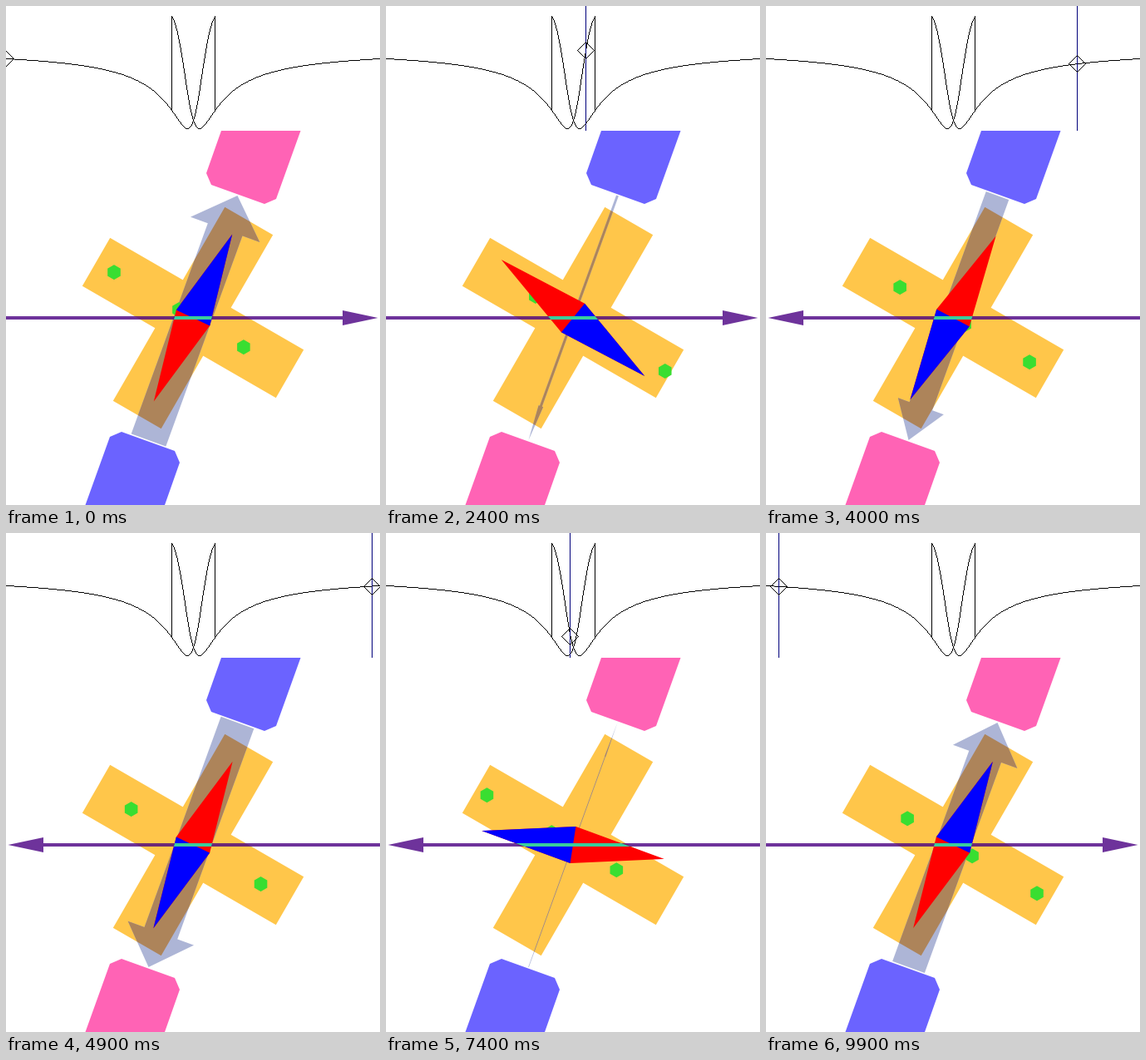
These frames come from a looping animation (450x600 px, 10000 ms). A matplotlib script:

```python
import numpy as np
import matplotlib.pyplot as plt
from matplotlib.animation import FuncAnimation
from matplotlib.collections import PolyCollection
from matplotlib.patches import Polygon

W, H, DPI = 450, 600, 100
FRAMES, STEP = 100, 100
MID = np.array([225.0, 375.0])

BLUE_PAD, PINK_PAD = "#6b63ff", "#ff63b5"
ORANGE, TEAL, GREEN = "#ffc64a", "#39ce9c", "#39de31"
INDIGO = (0.29, 0, 0.51, 0.8)
SHADE, SHADE_ON_CROSS = "#adb5d6", "#ad845a"
NAVY = "#00007b"

FIELD_ANGLE = np.radians(70)
BIAS = 22.5          # constant internal field, in plot pixels
SWITCH = 26          # applied field at which the bias flips
SWEEP_T = [0, 17, 31, 44, 48, 55, 65, 83, 99]
SWEEP_H = [-226, -34, 64, 187, 225, 157.5, 62, -69, -210]


def direction(angle):
    return np.array([np.cos(angle), -np.sin(angle)])


def local(points, angle):
    """Place (along, across) points on the axis through the centre."""
    d = direction(angle)
    n = np.array([-d[1], d[0]])
    p = np.asarray(points, float)
    return MID + p[:, :1] * d + p[:, 1:] * n


def moment_angle(h, bias):
    return np.arctan2(-h * np.sin(FIELD_ANGLE),
                      bias * BIAS - h * np.cos(FIELD_ANGLE))


def signal(h, bias):
    return 75 + 72 * np.sin(2 * moment_angle(h, bias) + np.pi / 3)


def bias_sign(i):
    """+1 or -1 after following the sweep up to step i."""
    sign = 1
    for h in np.interp(np.arange(i + 1), SWEEP_T, SWEEP_H):
        if h >= SWITCH:
            sign = -1
        elif h <= -SWITCH:
            sign = 1
    return sign


def trace(x, y):
    """Unit squares along a polyline, one pixel wide without smoothing."""
    pts = np.column_stack([np.round(x), np.round(y)])
    cells = []
    for p, q in zip(pts[:-1], pts[1:]):
        n = int(abs(q - p).max()) + 1
        cells.append(np.floor(np.linspace(p, q, n) + 0.5))
    corner = np.array([(0, 0), (1, 0), (1, 1), (0, 1)])
    return np.unique(np.vstack(cells), axis=0)[:, None] + corner


fig = plt.figure(figsize=(W / DPI, H / DPI), dpi=DPI, facecolor="white")
ax = fig.add_axes([0, 0, 1, 1])
ax.set_xlim(0, W)
ax.set_ylim(H, 0)
ax.axis("off")


def shape(points, color, z):
    patch = Polygon(points, closed=True, fc=color, ec="none", lw=0,
                    snap=False, zorder=z)
    return ax.add_patch(patch)


def thin_line(x, y, color="black", z=10):
    line = PolyCollection(trace(x, y), facecolors=color, edgecolors="none",
                          linewidths=0, zorder=z)
    line.set_snap(False)
    return ax.add_collection(line, autolim=False)


# response curve, one branch per bias direction
field = np.arange(-226, SWITCH + 1)
branch = np.append(signal(field, 1), signal(SWITCH, -1))
field = np.append(field, SWITCH)
thin_line(225 + field, branch)
thin_line(225 - field, branch)

a, b = 134.5, 33.4
cross = shape(local([(a, b), (b, b), (b, a), (-b, a), (-b, b), (-a, b),
                     (-a, -b), (-b, -b), (-b, -a), (b, -a), (b, -b), (a, -b)],
                    -np.pi / 6), ORANGE, 1)

pad = np.array([(259, 150), (354.5, 150), (325, 232), (311, 238),
                (247, 215), (241, 201)])
top_pad = shape(pad, PINK_PAD, 3)
low_pad = shape(2 * MID - pad, BLUE_PAD, 3)

blank = np.zeros((3, 2))
arrow = shape(blank, SHADE, 2)
arrow_on_cross = shape(blank, SHADE_ON_CROSS, 2.1)
arrow_on_cross.set_clip_path(cross)

turn = np.radians(90 + 60 * np.arange(6))
HEXAGON = 9 * np.column_stack([np.cos(turn), np.sin(turn)])
dots = [shape(blank, GREEN, 4) for _ in range(4)]

needle = shape(blank, "#ff0000", 5)
north = shape(blank, "#0000ff", 5.1)
bias_arrow = shape(blank, INDIGO, 6)
overlap = shape([(150, 373), (300, 373), (300, 377), (150, 377)], TEAL, 7)

cursor = thin_line([0, 0], [0, 150], NAVY)
diamond = thin_line([0, 0], [0, 0])


def draw_field(h):
    w = 0.196 * abs(h)
    pts = local([(-156.4, -w / 2), (113, -w / 2), (113, -w), (156.4, 0),
                 (113, w), (113, w / 2), (-156.4, w / 2)],
                FIELD_ANGLE + (np.pi if h > 0 else 0))
    arrow.set_xy(pts)
    arrow_on_cross.set_xy(pts)
    top_pad.set_facecolor(BLUE_PAD if h > 0 else PINK_PAD)
    low_pad.set_facecolor(PINK_PAD if h > 0 else BLUE_PAD)


def draw_dots(i):
    pitch = 90 * np.cos(np.pi / 6)
    start = (-95 - 0.015 * pitch * i) % pitch
    for k, dot in enumerate(dots):
        x = start + (k - 2) * pitch
        dot.set_xy(HEXAGON + MID + (x, x * np.tan(np.pi / 6)))
        dot.set_visible(abs(x) < 112.5)


def draw_needle(angle):
    tip, left, right, tail = local([(111, 0), (0, -22.3), (0, 22.3),
                                    (-111, 0)], angle)
    needle.set_xy([tip, right, tail, left])
    north.set_xy([tip, left, right])
    overlap.set_clip_path(needle)


def draw_bias(sign):
    pts = np.array([(-225, -2), (180, -2), (180, -9), (222.5, 0),
                    (180, 9), (180, 2), (-225, 2)], float)
    bias_arrow.set_xy(MID + pts * (sign, 1))


def draw_cursor(h, y):
    x = 225 + np.round(h)
    cursor.set_verts(trace([x, x], [0, 149]))
    diamond.set_verts(trace(x + 10 * np.array([1, 0, -1, 0, 1]),
                            np.round(y) + 10 * np.array([0, 1, 0, -1, 0])))


def update(i):
    h = np.interp(i, SWEEP_T, SWEEP_H)
    sign = bias_sign(i)
    draw_field(h)
    draw_dots(i)
    draw_needle(moment_angle(h, sign))
    draw_bias(sign)
    draw_cursor(h, signal(h, sign))
    return []


anim = FuncAnimation(fig, update, frames=FRAMES, interval=STEP,
                     repeat=True, repeat_delay=0, blit=False)
plt.show()
```
